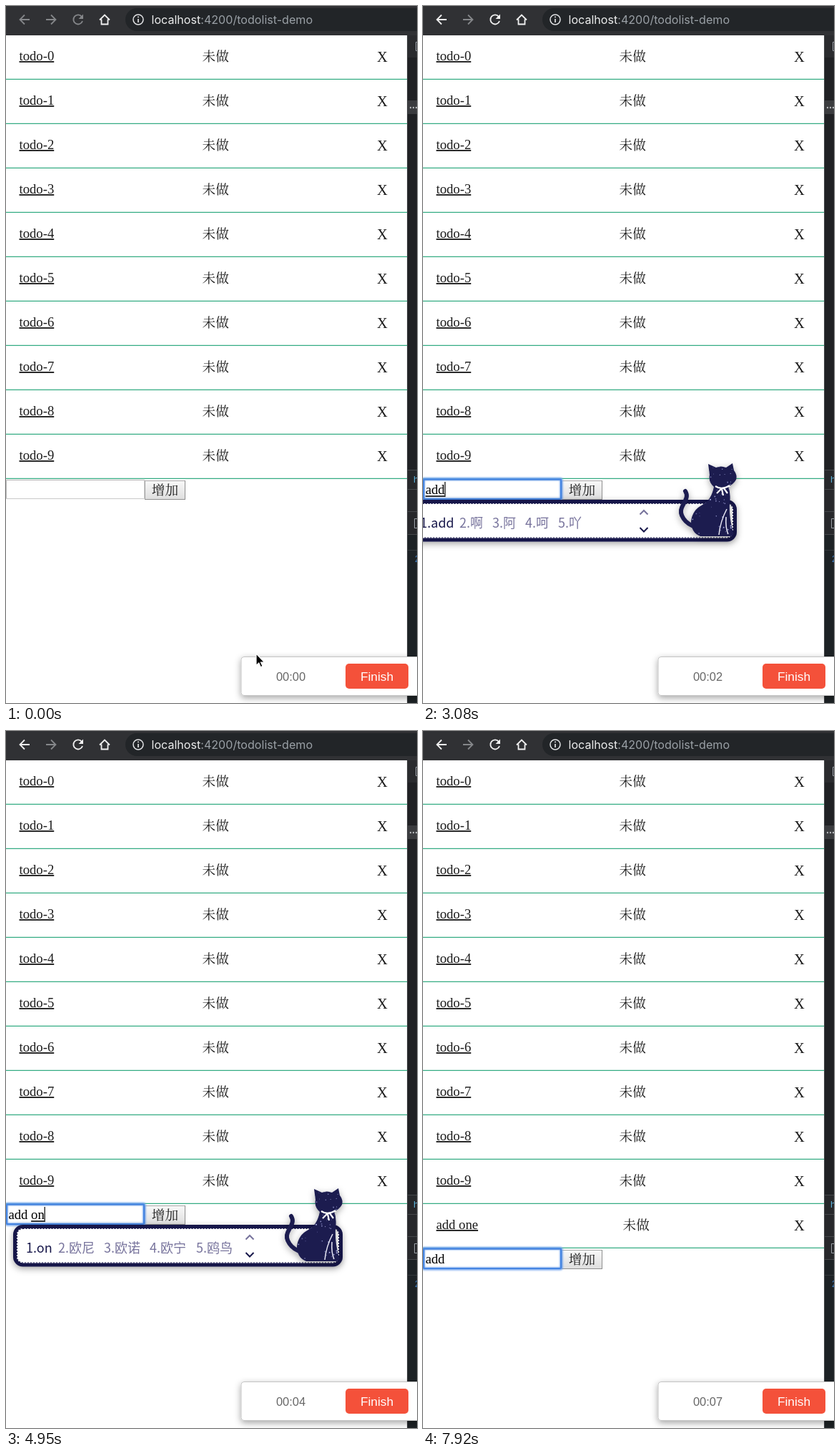
These frames come from a looping animation (575x974 px, 8000 ms). An HTML page:

```html
<!DOCTYPE html>
<html lang="zh">
<head>
<meta charset="utf-8">
<title>todolist-demo</title>
<style>
  html, body { margin: 0; width: 100%; height: 100%; overflow: hidden; background: #fff; }
  svg { display: block; width: 575px; height: 974px; }
  text { white-space: pre; }
  .serif { font: 18.67px "Liberation Serif", "Noto Serif CJK SC", "Noto Sans CJK SC", serif; fill: #1b1b1b; }
  .zh { font-family: "Noto Serif CJK SC", "Noto Sans CJK SC", serif; font-weight: 300; }
  .link { text-decoration: underline; text-decoration-thickness: 1px; }
  .sans { font-family: "Liberation Sans", Arial, sans-serif; }
  .url { font: 16.1px Inter, sans-serif; fill: #9aa0a6; }
  .ime { font: 18px "Noto Sans CJK SC", "Noto Sans", sans-serif; font-weight: 300; }
  .icon { fill: none; stroke-width: 1.8; }
</style>
</head>
<body>
<svg id="stage" viewBox="0 0 575 974">
  <defs>
    <linearGradient id="face" x2="0" y2="1">
      <stop stop-color="#f8f8f8"/><stop offset="1" stop-color="#dedede"/>
    </linearGradient>
    <filter id="shade" x="-20%" y="-40%" width="140%" height="190%">
      <feDropShadow dx="0" dy="3" stdDeviation="5" flood-opacity=".35"/>
    </filter>
    <filter id="glow" x="-5%" y="-20%" width="110%" height="140%">
      <feGaussianBlur stdDeviation=".8"/>
    </filter>
    <clipPath id="catClip"><use href="#catBody"/></clipPath>
  </defs>
  <rect width="575" height="974" fill="#fff"/>

  <g id="rows"></g>

  <g id="form">
    <path d="M.5 688.5V662.5H194" fill="none" stroke="#b5b5b5"/>
    <path d="M.5 688.5H193.5V662.5" fill="none" stroke="#c9c9c9"/>
    <rect x="194.5" y="663.5" width="56" height="26" fill="url(#face)" stroke="#a6a6a6"/>
    <path d="M194 689.5H250.5V663" fill="none" stroke="#8f8f8f"/>
    <text class="serif zh" x="222.5" y="682.5" text-anchor="middle">增加</text>
    <g id="ring" fill="none">
      <rect x=".5" y="661" width="193" height="28.5" rx="1.5" stroke="#6ea2ee" stroke-width="4" filter="url(#glow)"/>
      <rect x="1" y="661.5" width="192" height="27.5" rx="1" stroke="#4585e2" stroke-width="2.2"/>
    </g>
    <text id="value" class="serif" x="3.5" y="682" style="fill:#000"></text>
    <path id="under" stroke="#000" stroke-width="1.6"/>
    <path id="caret" stroke="#000" stroke-width="1.2"/>
  </g>

  <g id="panel">
    <g filter="url(#shade)">
      <rect x="12.5" y="692.5" width="456" height="53.5" rx="11" fill="#fff" stroke="#17174a" stroke-width="5"/>
    </g>
    <rect x="15.5" y="695.5" width="450" height="47.5" rx="8" fill="none" stroke="#17174a" stroke-width="1.2" stroke-dasharray="2 2"/>
    <g id="words"></g>
    <path d="M335.500 710.500l5.500-5.500 5.500 5.500" fill="none" stroke="#77739c" stroke-width="2"/>
    <path d="M335.500 729l5.500 5.500 5.500-5.500" fill="none" stroke="#17174a" stroke-width="2"/>
    <g filter="url(#shade)">
      <path d="M414 728C398 724 390 710 394 701C398 692 404 686 399 678" fill="none" stroke="#1b1b50" stroke-width="6" stroke-linecap="round"/>
      <path id="catBody" fill="#1b1b50" d="M431 640L442 645Q449 642 456 645L465 639L467 649Q472 655 470 662Q466 669 459 671Q463 682 461 694Q460 714 465 732Q469 741 461 741H420Q407 736 407 720Q409 704 423 697Q435 691 439 672Q431 665 433 655Z"/>
      <g id="stars" clip-path="url(#catClip)" fill="#b9bdf0"></g>
      <path d="M441 671Q450 677 461 670M449 675L443 681M450 675L452 684M453 674L458 681" fill="none" stroke="#fff" stroke-width="2.2"/>
      <path d="M457 703Q448 720 446 739M456 714Q455 730 459 738" fill="none" stroke="#e8e8f4" stroke-width="1.5"/>
    </g>
  </g>

  <g id="tools">
    <rect x="561" y="41" width="14" height="933" fill="#202124"/>
    <rect x="562" y="41" width="13" height="31" fill="#2a2b2e"/>
    <path d="M575 50.500H573.500V62.500H575" fill="none" stroke="#9aa0a6"/>
    <rect x="562" y="132" width="13" height="19" fill="#3b3c3f"/>
    <g fill="#b4b6b9"><circle cx="566" cy="142" r="1.2"/><circle cx="570" cy="142" r="1.2"/><circle cx="574" cy="142" r="1.2"/></g>
    <rect x="562" y="648" width="13" height="90" fill="#27282b"/>
    <path d="M562 648.500h13M562 675.500h13M562 706.500h13M562 738.500h13M562 760.500h13" stroke="#46484b"/>
    <text class="sans" x="570" y="666" font-size="13" fill="#5db0d7">h</text>
    <path d="M575 716.500H571.500V729.500H575" fill="none" stroke="#9aa0a6"/>
    <rect x="562" y="739" width="13" height="235" fill="#1d2225"/>
    <path d="M562 760.500h13" stroke="#34393c"/>
    <text class="sans" x="572" y="777" font-size="12" fill="#3f7fc4">2</text>
    <path d="M561.500 41V974" stroke="#47494c"/>
  </g>

  <g>
    <rect width="575" height="41" fill="#303134"/>
    <rect x="167" y="3" width="430" height="32" rx="16" fill="#222528"/>
    <path id="back" class="icon" d="M33 19H19.500M26 12.500L19.500 19L26 25.500"/>
    <path class="icon" stroke="#85878a" d="M56 19H69.500M63 12.500L69.500 19L63 25.500"/>
    <g id="reload">
      <path class="icon" d="M106 15A6.500 6.500 0 1 0 107 21"/>
      <path d="M108 11.500V18H101.500Z" fill="currentColor" stroke="none"/>
    </g>
    <path class="icon" stroke="#f1f1f1" d="M131 19.500L138 12.500L145 19.500M133.500 18.500V25.500H142.500V18.500"/>
    <circle class="icon" cx="185" cy="19" r="7" stroke="#e2e3e5" style="stroke-width:1.5"/>
    <path d="M185 18V23M185 14.500V16.300" stroke="#e2e3e5" stroke-width="1.7"/>
    <text class="url" x="203.500" y="24.500"><tspan fill="#eceded">localhost</tspan>:4200/todolist-demo</text>
  </g>

  <g>
    <rect x="329" y="909.500" width="260" height="54" rx="4" fill="#fff" stroke="#c4c4c4" filter="url(#shade)"/>
    <text id="clock" class="sans" x="378" y="942.500" font-size="16.400" fill="#666"></text>
    <rect x="475" y="919" width="88" height="35" rx="5" fill="#f4513a"/>
    <text class="sans" x="519" y="942.500" font-size="17.250" fill="#fff" text-anchor="middle">Finish</text>
  </g>

  <path id="arrow" d="M0 0V16.500L3.800 13L6.300 18.800L9 17.600L6.500 12H11.500Z" fill="#000" stroke="#fff" stroke-width="1.200"/>
  <g id="beam" fill="none">
    <path d="M-3.500-8.500Q0-8.500 0-6Q0-8.500 3.500-8.500M0-6V6M-3.500 8.500Q0 8.500 0 6Q0 8.500 3.500 8.500M-2 3H2" stroke="#fff" stroke-width="3"/>
    <path d="M-3.500-8.500Q0-8.500 0-6Q0-8.500 3.500-8.500M0-6V6M-3.500 8.500Q0 8.500 0 6Q0 8.500 3.500 8.500M-2 3H2" stroke="#000" stroke-width="1.300"/>
  </g>
</svg>
<script>
const LOOP = 8000, STEP = 110, ROW = 62;
const ADDED = 6160, ACTIVE = 1540;
const $ = id => document.getElementById(id);
const show = (el, on) => el.setAttribute('visibility', on ? 'visible' : 'hidden');

// time, committed text, text being composed, focused
const edits = [
  [0, '', '', false],
  [ACTIVE, '', '', true],
  [2530, '', 'a', true],
  [2640, '', 'ad', true],
  [2860, '', 'add', true],
  [3190, 'add', '', true],
  [3850, 'add ', '', true],
  [4400, 'add ', 'o', true],
  [4620, 'add ', 'on', true],
  [5060, 'add ', 'one', true],
  [5390, 'add one', '', true],
  [6050, 'add one', '', false],
  [6930, 'add one', '', true],
  [7040, 'add on', '', true],
  [7150, 'add o', '', true],
  [7260, 'add ', '', true],
  [7370, 'add', '', true]
];

// time, x, y of the pointer
const path = [
  [330, 350, 905], [1100, 292, 706], [1430, 131, 674],
  [5610, 131, 674], [6050, 222, 677], [6270, 222, 677],
  [6710, 158, 768], [6930, 131, 737]
];

const choices = {
  a: ['啊', '阿', '呵', '吖'],
  o: ['哦', '喔', '噢', '欧'],
  on: ['欧尼', '欧诺', '欧宁', '鸥鸟']
};

function addRow(i, name, x) {
  const y = i * ROW;
  $('rows').insertAdjacentHTML('beforeend', `<g>
    <text class="serif link" x="18.5" y="${y + 76}">${name}</text>
    <text class="serif zh" x="${x}" y="${y + 77}">未做</text>
    <text class="serif" x="526.5" y="${y + 78}" text-anchor="middle" style="font-size:20.5px">X</text>
    <path d="M0 ${y + 102.3}H561" stroke="#35ac83" stroke-width="1.3"/></g>`);
  return $('rows').lastElementChild;
}

function scatterStars() {
  let seed = 7, out = '';
  const rnd = () => (seed = seed * 16807 % 2147483647) / 2147483647;
  for (let i = 0; i < 90; i++) {
    const x = 406 + rnd() * 64, y = 642 + rnd() * 98;
    out += `<circle cx="${x}" cy="${y}" r="${.3 + rnd() * .7}" opacity="${.4 + rnd() * .6}"/>`;
  }
  $('stars').innerHTML = out;
}

function wordsFor(typed) {
  const list = choices[typed] || choices[typed[0]];
  const xs = [73, 137, 201, 266];
  const shift = Math.max(0, typed.length - 2) * 10;
  let out = `<text class="ime" x="28" y="729" fill="#17174a">1.${typed}</text>`;
  list.forEach((word, i) => {
    const x = list[0].length > 1 ? xs[i] + (i < 3 ? shift : 0) : 73 + shift + i * 46;
    out += `<text class="ime" x="${x}" y="729" fill="#77739c">${i + 2}.${word}</text>`;
  });
  return out;
}

function pointerAt(t) {
  let i = path.findIndex(p => p[0] > t);
  if (i === 0) return path[0].slice(1);
  if (i < 0) return path[path.length - 1].slice(1);
  const [t0, x0, y0] = path[i - 1], [t1, x1, y1] = path[i];
  const u = (t - t0) / (t1 - t0), e = u * u * (3 - 2 * u);
  return [x0 + (x1 - x0) * e, y0 + (y1 - y0) * e];
}

function drawInput(t) {
  const [since, text, draft, focus] = edits.filter(e => e[0] <= t).pop();
  const value = $('value');
  value.textContent = text;
  const start = 3.5 + (text ? value.getComputedTextLength() : 0);
  value.textContent = text + draft;
  const end = 3.5 + (text + draft ? value.getComputedTextLength() : 0);
  show($('ring'), focus);
  $('caret').setAttribute('d', `M${end + .4} 665V686`);
  show($('caret'), focus && (t - since) % 1000 < 500);
  $('under').setAttribute('d', `M${start} 685H${end}`);
  show($('under'), draft);
  $('panel').style.display = draft ? '' : 'none';
  if (draft) {
    $('words').innerHTML = wordsFor(draft);
    $('panel').setAttribute('transform', `translate(${text ? 0 : -32} 0)`);
  }
}

function drawPointer(t, drop) {
  const [x, y] = pointerAt(t);
  const seen = t < 2530 || (t >= 5720 && t < 7040);
  const inside = x < 194 && y > 662 + drop && y < 690 + drop;
  for (const id of ['arrow', 'beam']) {
    $(id).setAttribute('transform', `translate(${x} ${y})`);
    show($(id), seen && inside === (id === 'beam'));
  }
}

function draw(time) {
  const t = Math.floor(time % LOOP / STEP) * STEP;
  const drop = t >= ADDED ? ROW : 0;
  show(extra, drop);
  $('form').setAttribute('transform', `translate(0 ${drop})`);
  drawInput(t);
  drawPointer(t, drop);
  const tone = t >= ACTIVE ? '#f1f1f1' : '#85878a';
  $('back').style.stroke = $('reload').style.stroke = $('reload').style.color = tone;
  $('clock').textContent = '00:0' + Math.max(0, Math.floor((t - 250) / 1000));
}

for (let i = 0; i < 10; i++) addRow(i, 'todo-' + i, 274.5);
const extra = addRow(10, 'add one', 279.5);
scatterStars();
const begin = performance.now();
function tick() {
  draw(performance.now() - begin);
  requestAnimationFrame(tick);
}
tick();
</script>
</body>
</html>
```
